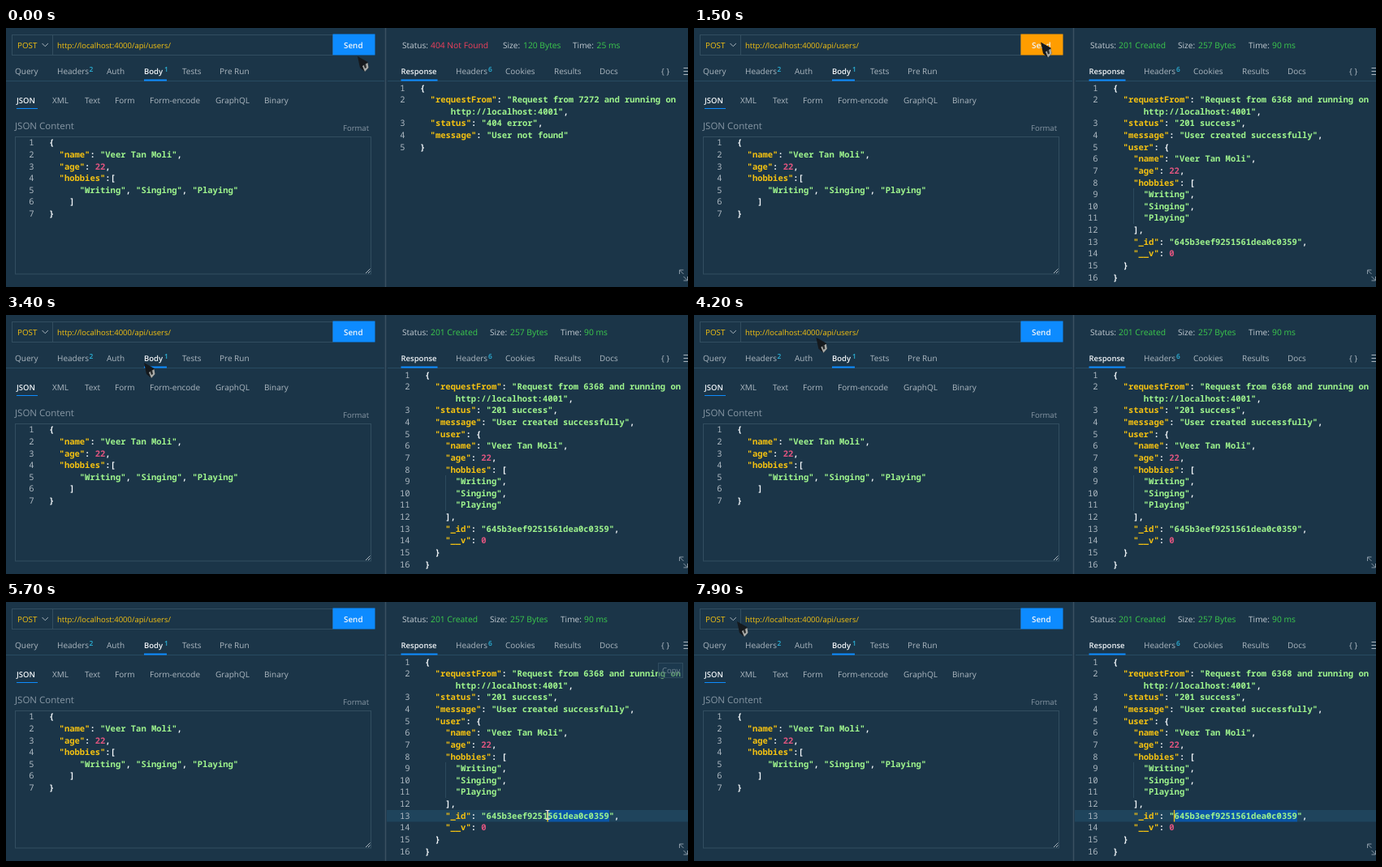
Recreate the animation shown at these times as an HTML page. Size 840 px wide and 320 px high, loop 8000 ms.

```html
<!DOCTYPE html>
<html lang="en">
<head>
<meta charset="utf-8">
<title>API client</title>
<style>
html, body { margin: 0; width: 840px; height: 320px; overflow: hidden; background: #1b3548; }
svg { display: block; font: 10px "Open Sans", "Noto Sans", sans-serif; text-rendering: geometricPrecision; }
text { white-space: pre; }
.code { font: 600 10.5px "Noto Sans Mono", "DejaVu Sans Mono", monospace; }
</style>
</head>
<body>
<svg id="stage" width="840" height="320" viewBox="0 0 840 320"></svg>
<script>
const LOOP = 8000, STEP = 100, CHAR = 6.3, ROW = 14.62;
const GREY = '#adb8c1', DIM = '#8797a4', WHITE = '#f2f6f9', BLUE = '#0d8bff',
  YELLOW = '#f5c211', GREEN = '#3ccb4c', STRING = '#9ff58d', CYAN = '#2bb5dc',
  LINE = '#324e60', RULE = '#284b61';

const text = (x, y, str, fill = GREY, size = 10, extra = '') =>
  `<text x="${x}" y="${y}" fill="${fill}" font-size="${size}" ${extra}>${str}</text>`;
const bold = (x, y, str, fill, size) => text(x, y, str, fill, size, 'font-weight="600"');
const rect = (x, y, w, h, fill, extra = '') =>
  `<rect x="${x}" y="${y}" width="${w}" height="${h}" fill="${fill}" ${extra}/>`;
const box = (x, y, w, h) => rect(x, y, w, h, 'none', `stroke="${LINE}"`);
const path = (d, stroke = GREY, width = 1) =>
  `<path d="${d}" fill="none" stroke="${stroke}" stroke-width="${width}"/>`;
const group = (id, body) => `<g id="${id}">${body}</g>`;

const tabs = (y, list, active) => list.map(([x, name]) =>
  name === active ? bold(x, y, name, WHITE, 9.5) : text(x, y, name)).join('');

const paint = line => line.replace(/("[^"]*")(?=:)|("[^"]*"?|http[^"]*")|(\d+)/g, (m, key, str) =>
  `<tspan fill="${key ? YELLOW : str ? STRING : '#e0557f'}">${m}</tspan>`);

// A line starting with ">" continues the one above and has no number.
function code(x, numX, y, src) {
  let n = 0;
  return '<g class="code">' + src.map((line, row) => {
    const by = y + row * ROW;
    const wrapped = line[0] === '>';
    const body = wrapped ? line.slice(1) : line;
    const indent = body.search(/\S/);
    const num = wrapped ? '' : `<text x="${numX}" y="${by}" fill="${GREY}" text-anchor="end" font-weight="500">${++n}</text>`;
    return num + `<text x="${x + indent * CHAR}" y="${by}" fill="${WHITE}">${paint(body.trim())}</text>`;
  }).join('') + '</g>';
}

// Items: x, label, value x, value, value colour
const status = items => items.map(([x, label, vx, value, fill = GREEN]) =>
  text(x, 25, label, '#c3ccd3', 10.1) + text(vx, 25, value, fill, 10.3, 'font-weight="500"')).join('');

const expand = path('M829.5 304v-5h5M829.5 299l5 5M834.5 307l5 5M839.5 307v5h-5', DIM);
const headerCount = bold(594, 54, '6', CYAN, 8.4);
const person = '"name": "Veer Tan Moli",';

const left = [
  box(7.5, 8.5, 50, 25), box(57.5, 8.5, 345, 25),
  text(14, 24.5, 'POST', YELLOW, 9.8),
  path('M44.5 19l3.7 3.7l3.7-3.7'),
  text(63, 24.5, 'http://localhost:4000/api/users/', YELLOW, 9.5),
  group('send', rect(402.5, 7.5, 52, 26, BLUE, 'id="sendBox"') + bold(416, 24.5, 'Send', WHITE, 9.9)),
  tabs(56.5, [[11, 'Query'], [63, 'Headers'], [124, 'Auth'], [170, 'Body'], [217, 'Tests'], [263, 'Pre Run']], 'Body'),
  bold(102.5, 54, '2', CYAN, 8.4), bold(195, 54, '1', CYAN, 8.4),
  path('M0 65.5H466', RULE), rect(170, 63.5, 28, 2, BLUE),
  tabs(92.5, [[13, 'JSON'], [57, 'XML'], [97, 'Text'], [134, 'Form'], [177, 'Form-encode'],
    [258, 'GraphQL'], [318, 'Binary']], 'JSON'),
  rect(13, 99, 26, 1, BLUE),
  text(11, 124.5, 'JSON Content', DIM, 11.5),
  text(415, 126.5, 'Format', DIM, 9.5),
  box(11.5, 134.5, 438, 169.5),
  path('M443 303l5.5-5.5M446 303l2.5-2.5'),
  code(53, 34.5, 145.3, ['{', '  ' + person, '  "age": 22,', '  "hobbies":[',
    '      "Writing", "Singing", "Playing"', '    ]', '}'])
].join('');

const right = [
  path('M467.5 0V320', '#3a5061', 1.5),
  tabs(56.5, [[486.5, 'Response'], [554, 'Headers'], [615, 'Cookies'], [675, 'Results'], [731, 'Docs']], 'Response'),
  text(807, 56.5, '{ }'),
  path('M834.5 49.5H840M834.5 53.5H840M834.5 57.5H840'),
  path('M470 65.5H840', RULE), rect(486.5, 63.5, 45, 2, BLUE)
].join('');

const failed = group('failed', headerCount + expand +
  status([[488, 'Status:', 523, '404 Not Found', '#f2405c'], [612, 'Size:', 637, '120 Bytes'], [698, 'Time:', 727.5, '25 ms']]) +
  code(510, 491.5, 77.6, ['{', '  "requestFrom": "Request from 7272 and running on', '>      http://localhost:4001",',
    '  "status": "404 error",', '  "message": "User not found"', '}']));

const waiting = group('waiting',
  text(488, 25, 'Processing, Please Wait...', '#c3ccd3', 10.3) +
  `<circle cx="660.5" cy="151" r="12" fill="none" stroke="#3a5163" stroke-width="2.2"/>` +
  group('spinner', path('M652 159.5A12 12 0 0 1 652 142.5', BLUE, 2.4)) +
  text(660.5, 182, 'Processing...', DIM, 9.9, 'text-anchor="middle"') +
  text(660.5, 279, 'Cancel Request', '#6f818f', 9.5, 'text-anchor="middle"'));

const created = group('created', headerCount + expand +
  status([[488, 'Status:', 523, '201 Created'], [596, 'Size:', 621, '257 Bytes'], [683, 'Time:', 712, '90 ms']]) +
  path('M541.5 198V242', '#2c4a5d') +
  group('rowMark', rect(469, 257, 371, 14.5, '#1f445c') + rect(591.4, 257, 0, 14.5, '#0b55a5', 'id="selection"')) +
  code(516, 497.5, 77.6, ['{', '  "requestFrom": "Request from 6368 and running on', '>      http://localhost:4001",',
    '  "status": "201 success",', '  "message": "User created successfully",', '  "user": {',
    '    ' + person, '    "age": 22,', '    "hobbies": [', '      "Writing",', '      "Singing",', '      "Playing"',
    '    ],', '    "_id": "645b3eef9251561dea0c0359",', '    "__v": 0', '  }', '}']) +
  rect(591, 257, 1.3, 14.5, YELLOW, 'id="caret"'));

const copy = group('copy', rect(803.5, 75.5, 30, 18, '#1f3f54', `stroke="#2f4b5e" fill-opacity=".5"`) +
  text(808, 87.5, 'Copy', '#708593', 9.6));

const arrow = group('arrow', '<path d="M-1 -2L11.5 5L12.5 12L8 17L2 12Z" fill="#15191d"/>' +
  '<path d="M5 10L11.5 6L12.5 12L8 17Z" fill="#a9aba8"/><path d="M6.5 8.5L9 7L10 12L8 13Z" fill="#2a2c2d"/>');
const beam = group('beam', path('M-2.5 -6H2.5M0 -6V5M-2.5 5H2.5', '#dfe6ea', 1.1));

const $ = id => document.getElementById(id);
$('stage').innerHTML = left + right + failed + waiting + created + copy + arrow + beam;

// Pointer path: time, x, y
const track = [
  [0, 434, 37], [300, 428, 19.5], [1600, 428, 19.5], [1900, 560, 70], [2200, 675, 116], [2500, 690, 112],
  [2800, 698, 111], [2900, 698, 111], [3400, 171, 61], [3700, 37, 21], [3800, 37, 21], [4300, 180, 32],
  [4700, 438, 136], [4800, 485, 174], [5500, 743, 264], [5600, 743, 264], [5800, 591, 263], [6600, 591, 263],
  [6700, 581, 246], [7500, 22, 24], [7900, 54, 26], [LOOP, 54, 26]
];

function pointer(t) {
  const i = track.findIndex(k => k[0] > t);
  const [t0, x0, y0] = track[i - 1], [t1, x1, y1] = track[i];
  const p = (t - t0) / (t1 - t0);
  return [x0 + (x1 - x0) * p, y0 + (y1 - y0) * p];
}

const show = (id, on) => $(id).setAttribute('display', on ? 'inline' : 'none');

function draw(now) {
  const t = Math.floor(now % LOOP / STEP) * STEP;
  const [x, y] = pointer(t);
  const busy = t >= 1000 && t < 1500;
  const overSend = x > 403 && x < 454 && y > 8 && y < 34;
  const overCode = x > 500 && y > 68;

  show('failed', t < 1000);
  show('waiting', busy);
  show('created', t >= 1500);
  show('copy', overCode && t >= 1500);
  $('send').setAttribute('opacity', busy ? 0.6 : 1);
  $('sendBox').setAttribute('fill', overSend ? '#ff9d00' : BLUE);
  $('spinner').setAttribute('transform', `rotate(${12 + (t - 1000) * 0.36} 660.5 151)`);

  const end = 743, start = t < 5800 ? Math.min(end, x) : 591.4;
  show('rowMark', t >= 5500);
  show('caret', t >= 5500);
  $('selection').setAttribute('x', start);
  $('selection').setAttribute('width', Math.max(0, end - start));
  $('caret').setAttribute('x', start - 0.5);

  const typing = overCode && t < 6700;
  show('arrow', !typing);
  show('beam', typing);
  for (const id of ['arrow', 'beam']) $(id).setAttribute('transform', `translate(${x} ${y})`);
}

const began = performance.now();
function tick() {
  draw(performance.now() - began);
  requestAnimationFrame(tick);
}
tick();
</script>
</body>
</html>
```
